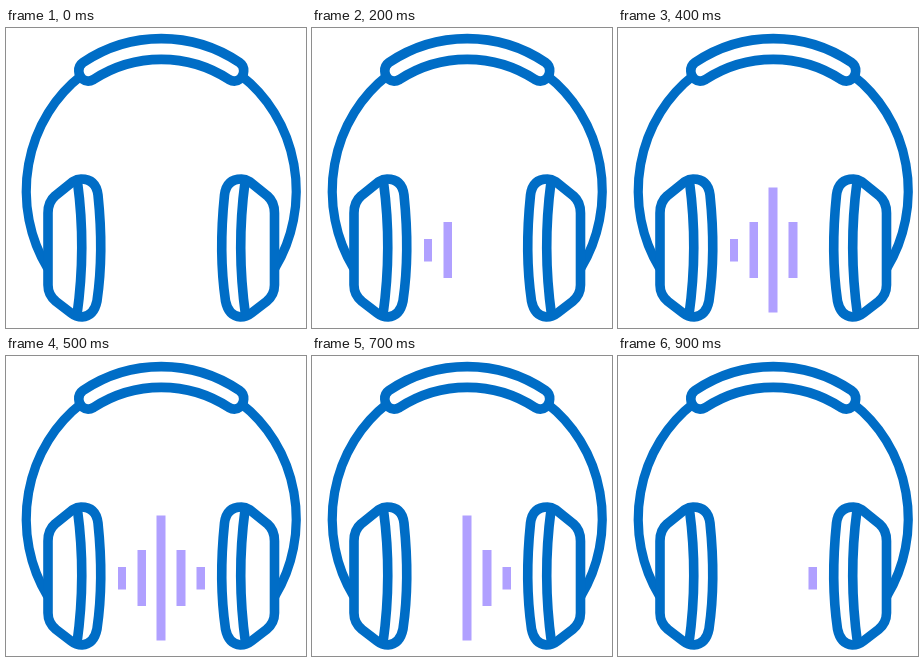
Animation, 300 px wide and 300 px high, one loop 1000 ms. Source, as an HTML page:

```html
<!DOCTYPE html>
<html lang="en">
<head>
<meta charset="utf-8">
<title>Headphones</title>
<style>
  html, body { margin: 0; width: 100%; height: 100%; overflow: hidden; background: #fff; }
  svg { display: block; width: 100vw; height: 100vh; }
  .line { fill: none; stroke: #006dc6; stroke-width: 9.6; stroke-linecap: round; stroke-linejoin: round; }
  .bars rect { fill: #b0a0ff; animation: pulse 1s step-end infinite; animation-delay: calc(var(--i) * 100ms - 1s); }
  /* each bar shows for half the loop, one step after its neighbour */
  @keyframes pulse { 0% { opacity: 1; } 50%, 100% { opacity: 0; } }
</style>
</head>
<body>
<svg viewBox="0 0 300 300">
  <g class="line">
    <g id="side">
      <path d="M76 47.2A135 143 0 0 0 41.5 240" stroke-width="9.2" stroke-linecap="butt"/>
      <path d="M67 153.5L49 168Q42 174 42 185V257Q42 267 50 273.5L65 285Q70 289 76 289Q88 288 91 273Q98 225 92 167Q90 151 75 151Q71 151 67 153.5Z"/>
      <path d="M71.5 154C77 195 77.5 240 71 287"/>
    </g>
    <use href="#side" transform="matrix(-1 0 0 1 310.5 0)"/>
    <path fill="#fff" d="M77 34.5A140 140 0 0 1 233.5 34.5C240 39 238 48 234 51Q229 55 223 51.5A124 124 0 0 0 87.5 51.5Q81.5 55 76.5 51C72.500 48 70.500 39 77 34.5Z"/>
  </g>
  <g class="bars">
    <rect style="--i:1" x="112" y="211" width="8" height="22.5"/>
    <rect style="--i:2" x="131.500" y="194" width="8.500" height="56"/>
    <rect style="--i:3" x="150.500" y="159.500" width="9" height="125"/>
    <rect style="--i:4" x="170.500" y="194" width="9" height="56"/>
    <rect style="--i:5" x="190.500" y="211" width="8.500" height="22.5"/>
  </g>
</svg>
</body>
</html>
```
